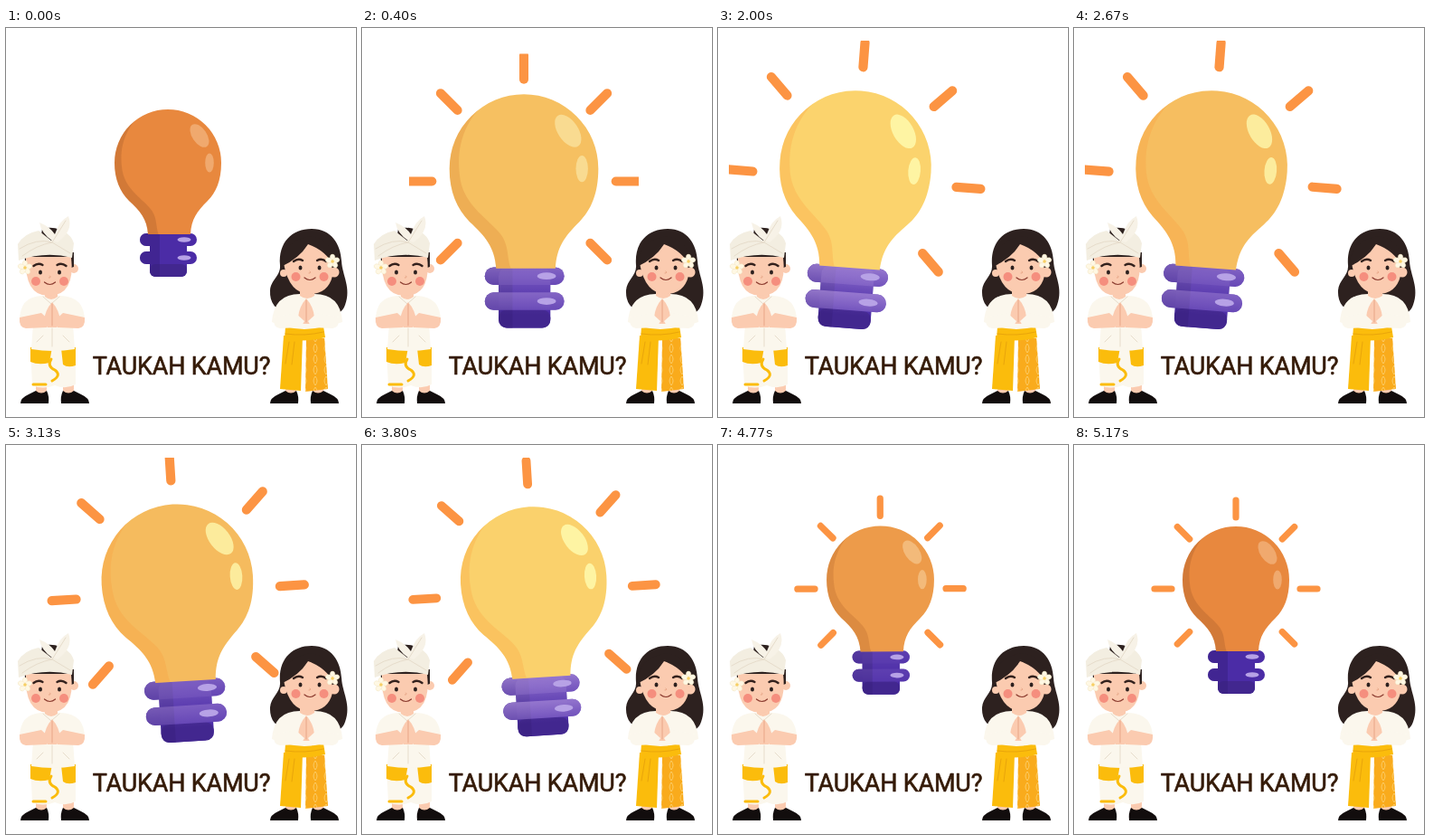
Recreate the animation shown at these times as an HTML page. Size 387 by 430 pixels, loop 5210 ms.

```html
<!DOCTYPE html>
<html lang="id">
<head>
<meta charset="utf-8">
<title>Taukah kamu?</title>
<style>
  html, body { margin: 0; width: 100%; height: 100%; overflow: hidden; background: #fff; }
  svg { display: block; width: 387px; height: 430px; }
  .title { font: 27px Roboto, "Open Sans", sans-serif; letter-spacing: -.2px; fill: #351b08; stroke: #351b08; stroke-width: .6; stroke-linejoin: round; }
  .skin { fill: #fbcbb0; }
  .cream { fill: #fbf7ed; }
  .dark { fill: #2d211f; }
  .gold { fill: #fbbc0c; }
  .line { fill: none; stroke-linecap: round; }
  .ink { stroke: #33211d; }
  .fold { stroke: #e6dccb; }
  .crease { stroke: #e6a384; }
</style>
</head>
<body>
<svg viewBox="0 0 387 430">
  <defs>
    <clipPath id="stage"><rect x="12" y="14" width="375" height="416"/></clipPath>
    <clipPath id="crop"><rect id="cropBox"/></clipPath>
    <path id="glass" d="M-59 0A59 59 0 1 1 59 0C59 20 53 33 44 42C32 54 26 62 25 79H-22C-23 62-31 53-43 42C-53 32-59 18-59 0Z"/>
    <clipPath id="glassClip"><use href="#glass"/></clipPath>
    <radialGradient id="glow" gradientUnits="userSpaceOnUse" r="62" gradientTransform="scale(1 1.15)">
      <stop id="core"/><stop id="rim" offset="1"/>
    </radialGradient>
    <linearGradient id="sheen" gradientUnits="userSpaceOnUse" x1="0" y1="78" x2="0" y2="116">
      <stop stop-color="#b99be2"/><stop offset="1" stop-color="#8b6bd0" stop-opacity="0"/>
    </linearGradient>
    <g id="ring"><rect x="-31" y="78" width="63" height="14" rx="7"/></g>
    <g id="cap">
      <rect x="-20" y="78" width="41" height="48" rx="7"/>
      <use href="#ring"/><use href="#ring" y="20"/>
    </g>
    <clipPath id="capLeft"><rect x="-40" y="70" width="31" height="60"/></clipPath>

    <ellipse id="petal" cy="-4" rx="2.8" ry="4" fill="#fff8e4" stroke="#efe0bb" stroke-width=".4"/>
    <g id="flower"></g>
    <pattern id="batik" width="12" height="12" patternUnits="userSpaceOnUse">
      <rect width="12" height="12" fill="#f9ab1c"/>
      <path d="M6 1Q10 6 6 11Q2 6 6 1" fill="none" stroke="#fccb64"/>
    </pattern>

    <!-- Parts both children share; halves are mirrored around x = 0. -->
    <g id="leg">
      <path class="skin" d="M9 388H21V407H9Z"/>
      <path fill="#120d0d" d="M7 415Q6 407 9 401Q15 406 21 401L29 405Q38 409 38 415Z"/>
    </g>
    <g id="legs"><use href="#leg"/><use href="#leg" transform="scale(-1 1)"/></g>
    <path id="arm" d="M36 320L12 315L2 324L6 331L29 332Q37 331 36 320"/>
    <g id="arms"><use href="#arm"/><use href="#arm" transform="scale(-1 1)"/></g>
    <g id="hands">
      <path class="skin" d="M-9 324Q-8 312 0 303Q8 312 9 324L5 331H-5Z"/>
      <path class="line crease" stroke-width=".9" d="M0 305V329"/>
    </g>
    <g id="halfFace">
      <ellipse class="dark" cx="10.5" rx="2" ry="2.6"/>
      <circle cx="15.5" cy="10" r="5" fill="#f58e7e"/>
      <path class="line ink" stroke-width="2.4" d="M8-8Q13-11 18-7"/>
    </g>
    <g id="face">
      <use href="#halfFace"/><use href="#halfFace" transform="scale(-1 1)"/>
      <path class="line" stroke="#8a3a2e" stroke-width="1.2" d="M-6 11Q0 16 6 11"/>
      <path class="line crease" d="M0 4Q2 6-1 6"/>
    </g>
  </defs>

  <g clip-path="url(#stage)">
    <g id="bulb">
      <g id="rays" clip-path="url(#crop)" stroke="#fc9443" stroke-width="7.2" stroke-linecap="round"></g>
      <use href="#cap" fill="#4b2ca6"/>
      <rect x="-20" y="112" width="41" height="14" rx="6" fill="#42278f"/>
      <use href="#cap" fill="#38207f" opacity=".5" clip-path="url(#capLeft)"/>
      <use id="capSheen" href="#cap" fill="url(#sheen)"/>
      <g fill="#b7a2e6">
        <ellipse cx="18" cy="85" rx="7.5" ry="2.8"/><ellipse cx="18" cy="105" rx="7.5" ry="2.8"/>
      </g>
      <use href="#glass" fill="url(#glow)"/>
      <path id="shade" clip-path="url(#glassClip)" d="M-62-62H-18C-44-46-54-22-51 4C-49 28-30 38-20 50C-11 60-14 70-10 80H-62Z"/>
      <g id="shine">
        <ellipse cx="35" cy="-30" rx="8" ry="14.5" transform="rotate(-34 35 -30)"/>
        <ellipse cx="46" rx="4.8" ry="10.5"/>
      </g>
    </g>
  </g>

  <g id="boy">
    <use href="#legs" x="54"/>
    <path class="cream" d="M27 352H77V394Q66 400 54 395Q40 400 29 395Z"/>
    <path class="gold" d="M27 353H51L48 370Q36 373 27 369ZM61 354L77 353V373Q68 376 63 372Z"/>
    <path class="line" stroke="#fbbc0c" stroke-width="3" d="M50 366Q45 374 54 378Q62 384 51 390M30 394H44"/>
    <path class="cream" d="M39 296Q15 297 15 324L30 327L28 355Q52 359 76 355L74 327L87 324Q87 297 61 296Z"/>
    <path class="line fold" d="M51 332V352M34 347L41 340M70 347L63 340M41 297L50 305L59 297"/>
    <path class="skin" d="M43 290H57V297Q50 303 43 297Z"/>
    <use href="#arms" class="skin" x="51"/>
    <use href="#hands" x="51"/>
    <circle class="skin" cx="75" cy="266" r="5"/>
    <path class="dark" d="M20 248H75V264L69 266L66 254H27L22 266Z"/>
    <path class="skin" d="M22 253H72Q77 296 47 296Q20 296 22 253Z"/>
    <path class="dark" d="M40 222Q50 219 60 223V235H38Z"/>
    <path d="M13 239Q20 227 36 224L50 235L63 224Q73 230 75 238L73 254Q44 246 14 257Z" fill="#f3eee1"/>
    <path d="M51 235Q39 227 37 215Q49 220 54 228Q59 213 69 208Q75 224 57 237Z" fill="#f7f2e7"/>
    <path class="line fold" d="M15 244Q34 232 51 237L71 249M18 252Q34 240 51 237L66 213"/>
    <use href="#face" x="48.5" y="270"/>
    <use href="#flower" x="21" y="265"/>
  </g>

  <g id="girl">
    <path class="dark" d="M303 262C301 237 316 222 338 222C360 222 370 239 371 258C372 274 382 287 375 306Q371 318 355 318L312 315Q291 311 292 290C293 278 304 274 303 262Z"/>
    <use href="#legs" x="330"/>
    <path class="gold" d="M307 340H328L326 401L303 399Z"/>
    <path d="M332 340H352L356 399L331 402Z" fill="url(#batik)"/>
    <path class="cream" d="M325 294Q296 294 294 325L310 332L309 343H352L351 332L372 325Q370 294 341 294Z"/>
    <path class="gold" d="M309 330Q330 336 351 330L353 342Q331 348 308 344Z"/>
    <path class="line" stroke="#e9a50b" d="M309 338Q330 341 351 336M313 347L309 371M319 347L316 372"/>
    <path class="skin" d="M325 286H341V296Q333 302 325 296Z"/>
    <use href="#hands" x="332" y="-4"/>
    <use href="#arms" class="cream" x="332"/>
    <circle class="skin" cx="363" cy="270" r="5.5"/><circle class="skin" cx="307" cy="271" r="4"/>
    <path class="skin" d="M307 260Q314 240 334 238Q362 244 361 274Q356 294 336 294Q313 294 307 260Z"/>
    <path class="dark" d="M304 264Q306 234 337 230Q364 235 363 264Q354 246 334 239Q324 255 304 264Z"/>
    <use href="#face" x="336" y="265"/>
    <use href="#flower" x="361" y="258"/>
  </g>

  <text class="title" x="194" y="383" text-anchor="middle">TAUKAH KAMU?</text>
</svg>
<script>
const LOOP = 5210;
const $ = id => document.getElementById(id);

function add(parent, tag, attrs) {
  const node = document.createElementNS("http://www.w3.org/2000/svg", tag);
  set(node, attrs);
  parent.append(node);
  return node;
}

function set(node, attrs) {
  for (const name in attrs) node.setAttribute(name, attrs[name]);
}

for (let i = 0; i < 5; i++) add($("flower"), "use", { href: "#petal", transform: `rotate(${i * 72})` });
add($("flower"), "circle", { r: 1.8, fill: "#f7cf64" });

// Seven rays, 45 degrees apart, leaving out the one the cap would cover.
const rays = [];
for (let angle = -225; angle <= 45; angle += 45) {
  const a = angle * Math.PI / 180;
  const r = 68 + 3 * Math.sin(a) ** 2;
  const x = r * Math.cos(a), y = 5 + r * Math.sin(a) + 5 * Math.cos(a) ** 4;
  rays.push(add($("rays"), "line", { transform: `translate(${x} ${y}) rotate(${angle})` }));
}

const mix = (a, b, k) => a + (b - a) * k;
const blend = (from, to, k) => `rgb(${from.map((v, i) => Math.round(mix(v, to[i], k))).join(",")})`;
const ORANGE = [232, 136, 62];

function draw(now) {
  const t = now % LOOP;
  const ease = (from, to) => {
    const k = Math.min(1, Math.max(0, (t - from) / (to - from)));
    return k * k * (3 - 2 * k);
  };

  const grow = ease(60, 460) - ease(3500, 4880);
  const left = ease(700, 1600) - ease(2650, 3200);
  const right = ease(2650, 3200) - ease(3500, 4950);
  const burst = ease(570, 720) - ease(4200, 4950);
  const lit = ease(0, 700) - ease(4330, 4950);
  const dim = ease(1200, 3000) - ease(3200, 4330);

  const x = 179 - 27 * left + 12 * right;
  const y = 149 + 7 * grow - 3 * left - 7 * right;
  const turn = 4.4 * left - 4 * right;
  set($("bulb"), { transform: `translate(${x} ${y}) rotate(${turn}) scale(${1 + .42 * grow})` });

  const half = 91 * ease(70, 400) + 40 * ease(570, 720);
  set($("cropBox"), { x: -half, y: -half, width: 2 * half, height: 2 * half });
  const spread = 2 * grow + 6.5 * burst;
  for (const ray of rays) set(ray, { x1: 3 + spread, x2: 22 + spread });

  set($("core"), { "stop-color": blend(ORANGE, [255, 194, 100], lit * (1 - dim)), offset: .4 * dim });
  set($("rim"), { "stop-color": blend(ORANGE, [255, 228, 120], lit * (1 - .45 * dim)) });
  set($("shade"), { fill: blend([150, 82, 40], [250, 140, 50], lit), opacity: .27 - .06 * lit });
  set($("shine"), { fill: blend([240, 169, 110], [255, 251, 168], lit * (1 - .2 * dim)) });
  set($("capSheen"), { opacity: lit * (.85 - .4 * dim) });
}

function tick() {
  draw(performance.now());
  requestAnimationFrame(tick);
}
tick();
</script>
</body>
</html>
```
